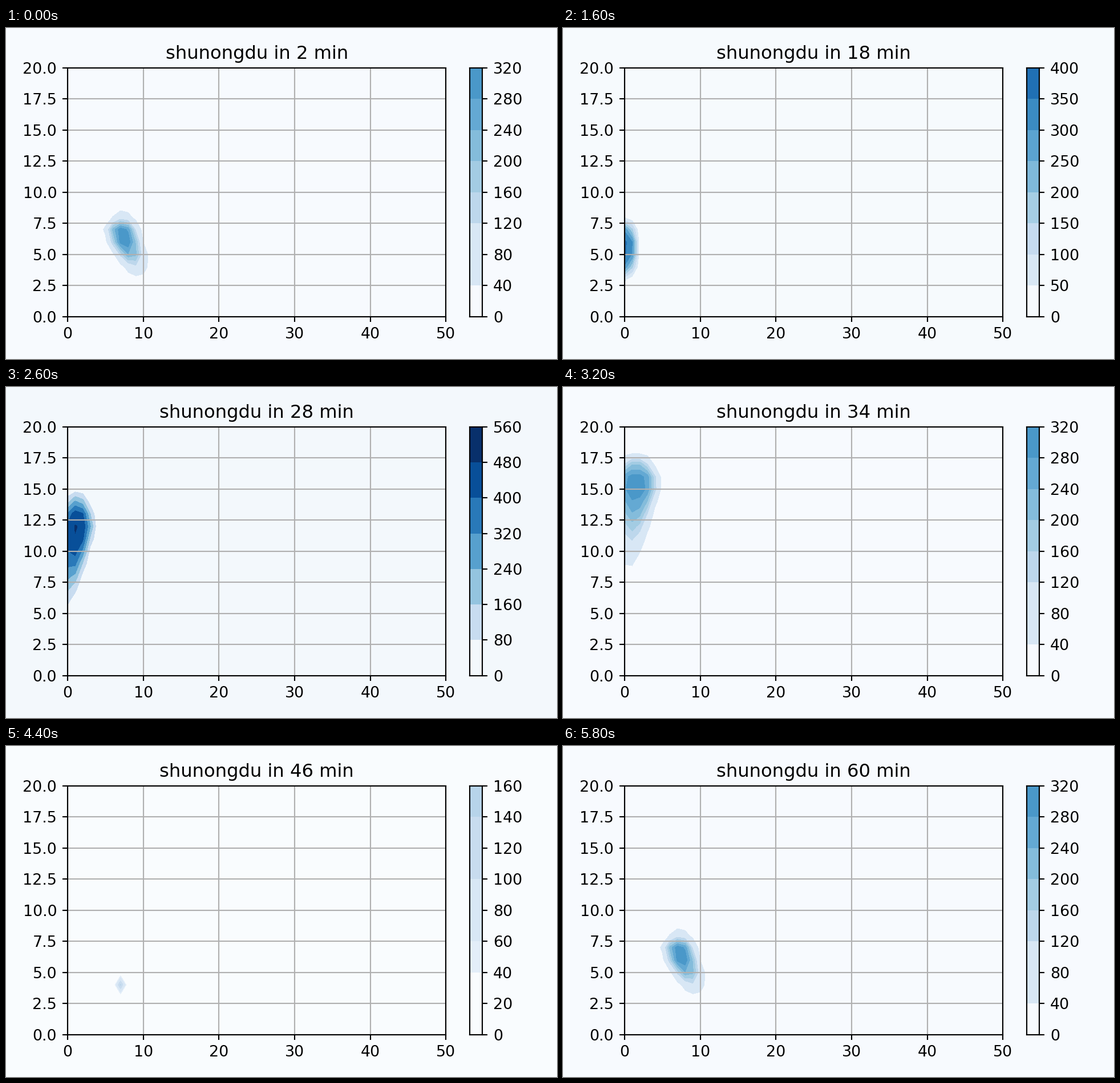
A matplotlib script for the animation above (6 s loop, 966 px wide and 580 px high).

```python
import matplotlib.pyplot as plt
import numpy as np
from matplotlib.animation import FuncAnimation
from matplotlib.ticker import MaxNLocator

W, H, DPI = 966, 580, 193.2
FRAMES, STEP_MS, VMAX = 30, 200, 500
X, Y = np.arange(51), np.arange(21)

# The tiny margin keeps rounding from losing a pixel.
fig = plt.figure(figsize=((W + 1e-3) / DPI, (H + 1e-3) / DPI), dpi=DPI)

# minute, peak, cx, cy, tilt, width, up, down, power, tail
RISING = np.array([
    (4, 18, 0, 5, 0, 0.9, 1, 1, 3, 1),
    (18, 365, 0, 5.6, 0, 1.55, 1.97, 2.27, 4.2, 1),
    (28, 484, 1.2, 11.8, 0.25, 2, 2.46, 4.8, 3.9, 0.6),
    (34, 300, 1.5, 15.2, 0.15, 2.8, 2.2, 4.5, 4.6, 0.42),
    (46, 0, 1.5, 17.2, 0.15, 2.8, 2.2, 4.5, 4.6, 0.42),
])
NEW = np.array([
    (44, 0, 7, 4, 0, 0.5, 0.5, 0.5, 3, 1),
    (46, 145, 7, 4, 0, 0.5, 0.5, 0.5, 3, 1),
    (54, 325, 8, 4.8, -1, 1.68, 1.59, 1.3, 3, 1),
    (60, 310, 7.2, 6.6, -0.7, 1.85, 1.26, 2.5, 2.8, 1),
])


def cloud(keys, minute):
    """Flat-topped bell whose lower part leans sideways and trails off."""
    peak, cx, cy, tilt, width, up, down, power, tail = (
        np.interp(minute, keys[:, 0], col) for col in keys[:, 1:].T)
    x, y = np.meshgrid(X, Y)
    above, below = np.maximum(y - cy, 0), np.maximum(cy - y, 0)
    dx = (x - cx + tilt * below) / width
    dy = above / up + (below / down) ** tail
    z = np.exp(-np.hypot(dx, dy) ** power)
    return peak * z / z.max()


def shades(levels):
    """Band colours with close pale bands merged, page colour, hidden bands."""
    frac = (levels[:-1] + levels[1:]) / 2 / VMAX
    rgb = plt.cm.Blues(frac)[:, :3]
    page = (1 + rgb[0]) / 2
    group = np.digitize(frac, [0.08, 0.11, 0.21, 0.27])
    group[0] = 0
    for g in (2, 3):
        if (group == g).any():
            rgb[group == g] = rgb[group == g].mean(axis=0)
    rgb[group == 0] = page
    return rgb, page, (group == 0).sum()


def add_axes(x, y, w, h, color):
    return fig.add_axes([x / W, y / H, w / W, h / H], facecolor=color)


def draw(i):
    minute = 2 * (i + 1)
    # The loop opens on its closing state.
    now = minute if i else 2 * FRAMES
    z = cloud(RISING, now) + cloud(NEW, now)
    levels = MaxNLocator(8, min_n_ticks=1).tick_values(0, z.max())
    rgb, page, first = shades(levels)

    fig.clf()
    fig.set_facecolor(page)
    ax = add_axes(108, 74.4, 663.4, 435.6, page)
    if first < len(rgb):
        ax.contourf(X, Y, z, levels=levels[first:], colors=rgb[first:])
    ax.set(xlim=(0, 50), ylim=(0, 20), xticks=np.arange(0, 51, 10),
           yticks=np.arange(0, 20.1, 2.5), title=f"shunongdu in {minute} min")
    ax.grid(True)

    bar = add_axes(813, 74.4, 22, 435.6, page)
    bar.pcolormesh([0, 1], levels, rgb[:, None, :])
    bar.yaxis.tick_right()
    bar.set(xlim=(0, 1), ylim=(0, levels[-1]), xticks=[], yticks=levels)
    return []


anim = FuncAnimation(fig, draw, frames=FRAMES, interval=STEP_MS,
                     init_func=lambda: draw(0), repeat=True, repeat_delay=0)
plt.show()
```
